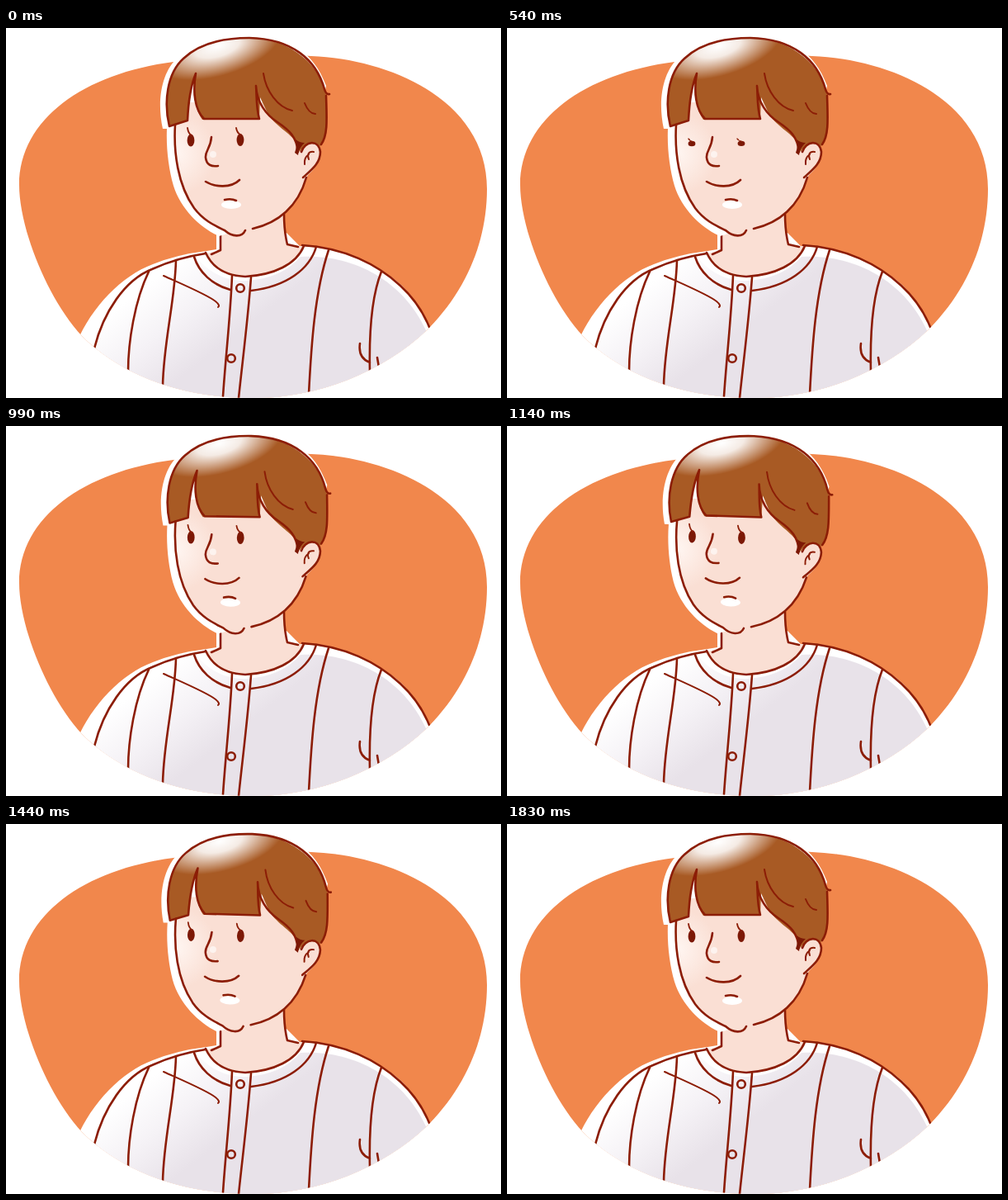
Animation of 600x448 px, one loop 1.86 s. Source, as an HTML page:

```html
<!DOCTYPE html>
<html lang="en">
<head>
<meta charset="utf-8">
<style>
html, body { margin: 0; width: 100%; height: 100%; overflow: hidden; background: #fff; }
svg { display: block; width: 600px; height: 448px; }
.ink { fill: none; stroke: #8c1d06; stroke-width: 2.6; stroke-linecap: round; stroke-linejoin: round; }
.thin { stroke-width: 2; }
.white { fill: #fff; }
.dark { fill: #7c1805; }
</style>
</head>
<body>
<svg viewBox="0 0 600 448">
  <defs>
    <path id="blob" d="M16 190C16 110 95 55 203 41C255 33 320 30 370 34C470 38 583 90 583 195C583 255 560 315 513 363C460 415 380 448 300 448C210 448 140 420 92 373C48 325 16 240 16 190Z"/>
    <clipPath id="stage"><use href="#blob"/></clipPath>
    <linearGradient id="cloth" gradientUnits="userSpaceOnUse" x1="165" y1="315" x2="235" y2="405">
      <stop offset="0" stop-color="#fff"/><stop offset=".5" stop-color="#f5f2f6"/><stop offset="1" stop-color="#e8e2e9"/>
    </linearGradient>
    <radialGradient id="skin" gradientUnits="userSpaceOnUse" cx="205" cy="152" r="50">
      <stop offset="0" stop-color="#fff6f2"/><stop offset="1" stop-color="#fadfd4"/>
    </radialGradient>
    <radialGradient id="shine" gradientUnits="userSpaceOnUse" cx="0" cy="0" r="1" gradientTransform="translate(256 22) rotate(-16) scale(80 36)">
      <stop offset="0" stop-color="#fff"/><stop offset=".35" stop-color="#fff" stop-opacity=".88"/><stop offset="1" stop-color="#fff" stop-opacity="0"/>
    </radialGradient>
  </defs>

  <use href="#blob" fill="#f1874c"/>

  <!-- shirt -->
  <g clip-path="url(#stage)">
    <path class="white" d="M86 380C104 338 140 300 178 286Q208 274 243 270L255 268V248H340L356 264C410 266 452 287 480 312Q502 334 514 364V448H86Z"/>
    <path fill="url(#cloth)" d="M107 388C121 345 142 312 173 296Q198 284 231 278C250 300 270 306 292 306C330 303 347 288 357 277C425 273 484 310 509 366V448H107Z"/>
  </g>

  <!-- neck -->
  <path fill="#fadfd4" d="M260 240L337 220Q337 246 341 262L361 265C352 288 325 300 290 301C265 300 250 290 243 273L260 269Z"/>
  <path class="ink" d="M337 225Q337 246 341 262L354 265M260 251V269L249 274"/>

  <g clip-path="url(#stage)">
    <path class="ink" d="M107 388C118 344 144 305 177 292Q208 278 242 273M359 263C410 266 450 286 478 312Q501 333 513 362"/>
    <path class="ink" d="M242 272C250 290 265 300 290 301C325 299 352 286 361 264M228 277C234 296 250 311 272 317M376 265C368 292 340 313 297 318"/>
    <path class="ink" d="M173 295C156 330 148 380 148 416M206 281C205 330 191 380 190 433M274 300C272 350 266 400 263 446M297 302C293 355 287 400 282 448M391 269C374 320 370 385 367 443M455 295C443 325 440 370 441 416M429 382C427 396 433 402 441 405M450 399L452 411"/>
    <path class="ink thin" d="M191 300C213 310 244 323 254 331Q260 336 257 338"/>
    <g class="ink"><circle cx="284" cy="315" r="4.8"/><circle cx="273" cy="400" r="4.8"/></g>
  </g>

  <g id="head">
    <path class="white" d="M190 122C182 85 190 52 208 36C232 16 265 9 298 10C342 11 372 27 388 70L365 180L300 240L258 252C236 242 212 220 203 191C197 170 194 145 195 122Z"/>
    <path fill="url(#skin)" d="M205 112C203 150 208 190 228 218C240 234 255 240 265 245C274 253 286 254 290 245L299 243C330 236 355 215 364 180C374 171 381 162 381 150C380 137 368 135 358 145L330 90H210Z"/>
    <path id="hair" fill="#a85a24" d="M198 119C191 90 195 55 215 37C235 18 265 12 295 12C348 13 383 48 388 82C389 112 391 132 381 143C373 136 362 139 356 150L352 139C345 127 325 118 317 103L308 84L307 110L238 111C230 100 226 82 229 56C223 72 221 90 220 112Z"/>
    <path fill="url(#shine)" d="M197 100C193 70 198 52 215 37C235 18 265 12 295 12C348 13 383 48 388 82V100Z"/>
    <path class="ink" d="M205 117C203 150 208 190 228 218C240 234 255 240 265 245C274 253 286 254 290 245M364 181C354 216 330 236 299 243"/>
    <path class="ink" d="M392 80Q388 81 386 74C376 38 346 13 295 12C265 12 235 18 215 37C195 55 191 90 198 119L220 112C221 90 223 72 230 55C226 78 229 99 240 110L307 110C303 96 304 82 303 70C304 90 315 105 329 114C344 124 352 132 354 150M388 82C389 112 390 130 382 141"/>
    <path class="dark" d="M351 135Q356 139 362 139Q355 145 354 154L350 151Q353 143 351 135Z"/>
    <path class="ink" d="M358 150C362 137 379 134 381 150C381 164 370 172 360 181"/>
    <path class="ink thin" d="M373 150C366 149 365 154 367 159M362 165Q361 157 367 153M312 55C315 76 329 96 347 100M362 91C366 101 370 104 375 104"/>
    <ellipse class="white" cx="273" cy="214" rx="12" ry="5"/>
    <circle class="white" cx="251" cy="153" r="4" opacity=".6"/>
    <path class="ink" d="M249 132C248 146 241 149 242 157C243 166 249 168 257 167M242 186C253 193 273 194 283 184"/>
    <path class="ink" stroke-width="3" d="M265 208Q273 206 279 209"/>
    <g id="eyes">
      <g class="dark"><ellipse cx="224" cy="136" rx="4.4" ry="7.6"/><ellipse cx="284" cy="135.5" rx="4.4" ry="7.6"/></g>
      <path class="ink" style="stroke-width:1.8" d="M220 121Q221 128 225 130M279 121Q280 127 284 129"/>
    </g>
  </g>
</svg>
<script>
const LOOP = 1860, STEP = 30;
// [time, value] pairs
const tilt = [[0, 0], [780, 0], [1230, 2.05], [1290, 2.05], [1710, 0], [LOOP, 0]];
const lids = [[0, 1], [60, 1], [300, .42], [570, .42], [870, 1], [LOOP, 1]];
const head = document.getElementById('head');
const eyes = document.getElementById('eyes');
const ease = x => (1 - Math.cos(Math.PI * x)) / 2;

function valueAt(keys, t) {
  const i = keys.findIndex(k => k[0] > t);
  const [t0, a] = keys[i - 1], [t1, b] = keys[i];
  return a + (b - a) * ease((t - t0) / (t1 - t0));
}

function draw() {
  const t = Math.floor(performance.now() % LOOP / STEP) * STEP;
  head.setAttribute('transform', `rotate(${valueAt(tilt, t)} 290 150)`);
  eyes.setAttribute('transform', `translate(0 143) scale(1 ${valueAt(lids, t)}) translate(0 -143)`);
  requestAnimationFrame(draw);
}
draw();
</script>
</body>
</html>
```
